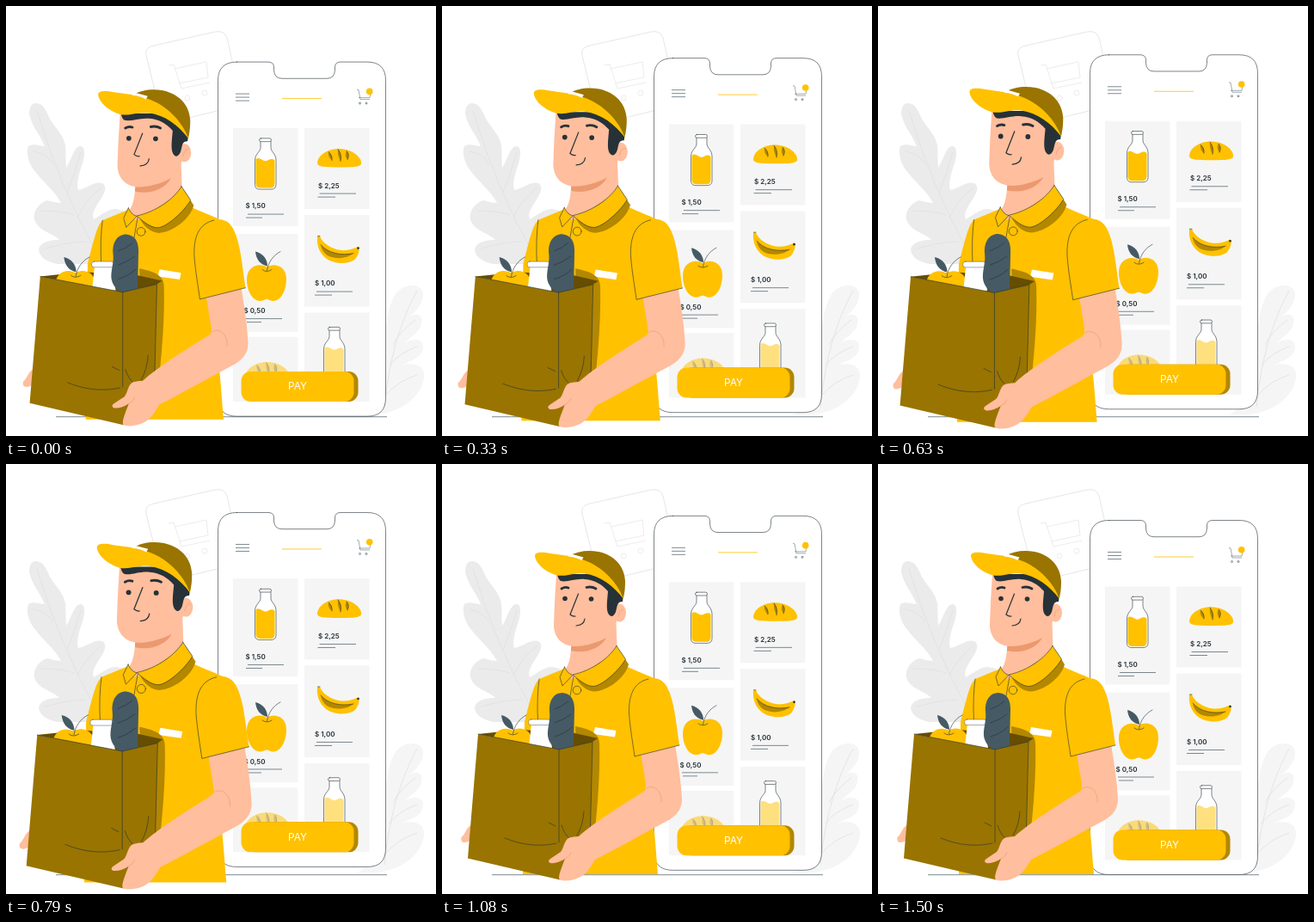
An HTML page for the animation above (1540 ms loop, 500 px wide and 500 px high).

```html
<!DOCTYPE html>
<html lang="en">
<head>
<meta charset="utf-8">
<title>Grocery delivery</title>
<style>
  html, body { margin: 0; width: 100%; height: 100%; overflow: hidden; background: #fff; }
  svg { display: block; width: 100vw; height: 100vh; }
  text { font: 600 8px Inter, sans-serif; fill: #263238; }
  .pay { font: 400 11.8px Inter, sans-serif; fill: #fff; text-anchor: middle; }
  .yellow { fill: #ffc100; }
  .olive { fill: #997400; }
  .shade { fill: #b38700; }
  .skin { fill: #ffbe9d; }
  .blush { fill: #eb996e; }
  .slate { fill: #455a64; }
  .ink { fill: #263238; }
  .white { fill: #fff; }
  .card { fill: #f5f5f5; }
  .line { fill: none; stroke: #263238; stroke-width: .6; stroke-linecap: round; stroke-linejoin: round; }
  .rule { fill: none; stroke: #455a64; stroke-width: .7; }
  .faint { fill: none; stroke: #e0e0e0; stroke-width: .8; }
  .face { stroke-width: 1.2; }
  .brow { stroke-width: 2.8; }
</style>
</head>
<body>
<svg viewBox="0 0 500 500">
  <defs>
    <g id="bottle">
      <path class="white" d="M296 158V165C296 170 289.5 172 289.5 180V208Q289.5 213.5 295 213.5H308Q314 213.5 314 208V180C314 172 308 170 308 165V158Z"/>
      <path fill="var(--milk, #ffc100)" d="M290.5 178.5C295 174.5 299 183 304 180C308 177.500 311 178 312.500 180V207Q312 212 308 212H296Q290.5 212 290.5 207Z"/>
      <path class="line" d="M296 158V165C296 170 289.500 172 289.500 180V208Q289.500 213.500 295 213.500H308Q314 213.500 314 208V180C314 172 308 170 308 165V158"/>
      <rect class="line" style="fill:#fff" x="294.500" y="154.300" width="14" height="3.800" rx="1.900"/>
    </g>
    <g id="bread">
      <path class="yellow" d="M362 183C362.500 174 373 166.300 388 166.300C404 167 414 177 413 184C412 187.500 405 188 388 188C370 188 362 187.500 362 183Z"/>
      <path class="shade" d="M375 170Q380 174 379 180Q374 176 375 170ZM386 167Q391 173 389 181Q385 174 386 167ZM396 169Q400 173 397 179Q393 174 396 169Z"/>
      <path class="line" d="M375 170Q380 174 379 180M386 167Q391 173 389 181M396 169Q400 173 397 179"/>
    </g>
    <g id="apple">
      <path class="yellow" d="M303 304C296 299 280 301 280 319C280 332 287 343.500 295.500 343.500C300 343 301 341.500 303 341.500C306 341.500 307 343.500 311 343.500C319 343.500 326 332 326 318C326 301 310 299 303 304Z"/>
      <path class="slate" d="M304 303C295 301 291 295 290 286C299 288 304 295 304 303Z"/>
      <path class="line" d="M303.500 308C305 298 311 290 319 286M298 307Q303 311 309 307"/>
    </g>
  </defs>

  <!-- backdrop -->
  <path fill="#ebebeb" d="M35 113C44 113 47 123 51 131C57 142 66 148 69 162C70 172 69 180 70 188C76 180 78 165 86 163C93 162 92 176 88 186C84 198 82 206 84 214C94 212 104 203 112 206C120 211 112 222 106 231C102 238 100 243 102 248C110 244 118 236 128 236L137 238L120 300H60C50 298 40 294 38 284C39 274 52 272 62 272C55 264 37 262 33 248C31 238 40 228 48 226C55 228 60 229 64 229C56 214 42 204 32 190C26 182 23 170 26 163C32 159 40 163 45 163C40 150 30 140 27 126C27 117 30 113 35 113Z"/>
  <path class="faint" d="M36 122Q62 210 108 292M32 169Q48 172 55 184M87 170Q80 195 71 216M41 238Q66 238 79 243M111 211Q92 226 83 246M46 282Q72 274 94 274"/>
  <path fill="#f5f5f5" d="M408 475C425 470 438 440 441 390C441 370 445 345 455 332C466 322 486 322 485 337C484 350 474 356 469 362C476 356 486 358 483 370C481 380 470 384 464 392C472 386 486 386 485 397C484 410 470 412 460 418C470 414 488 416 486 432C484 450 465 472 430 475Z"/>
  <path class="faint" d="M478 331Q448 385 440 466M476 365Q456 380 450 394M478 396Q456 404 446 418M478 429Q456 436 442 452"/>
  <path class="faint" d="M163 58Q161 49 170 46.500L243 30Q254 28 257 37L271 100Q273 115 262 118L192 135Q183 137 181 130Z"/>
  <g class="faint" style="stroke:#e8e8e8">
    <path d="M189 69L195 68L204 96L237 89M196 73L233 65L235 83L201 90"/>
    <circle cx="211" cy="107" r="3"/><circle cx="231" cy="101" r="3"/>
  </g>
  <path class="rule" d="M58 477.700H443"/>

  <g id="phone">
    <path class="line" style="fill:#fff" d="M268.500 65.500H305Q311 65.500 311.500 71V75Q312 84.700 321 84.700H373Q382 84.700 382.500 75V71Q383 65.500 389 65.500H420Q441.500 65.500 441.500 87V456Q441.500 477.500 420 477.500H268.500Q246.500 477.500 246.500 456V87Q246.500 65.500 268.500 65.500Z"/>
    <path class="rule" d="M267 102.500H283M267 106.500H283M267 110.500H283"/>
    <path d="M321 108H367" stroke="#ffc100" stroke-width=".8"/>
    <path class="rule" style="stroke-width:.5" d="M408 97.500L410 98L412 109H423M410 107H423L424 101"/>
    <circle class="rule" cx="411.500" cy="113.500" r="1"/><circle class="rule" cx="419" cy="113.500" r="1"/>
    <circle class="yellow" cx="422.700" cy="99.800" r="3.800"/>
    <path class="card" d="M264 142.400h75.500v114h-75.500zM347 142.400h75.500v94h-75.500zM264 265.400h75.500v114h-75.500zM347 243.400h75.500v106.600h-75.500zM264 385.200h75.500v75.200h-75.500zM347 357h75.500v103.400h-75.500z"/>
    <use href="#bottle"/>
    <use href="#bottle" x="80" y="219.500" style="--milk:#ffe07f"/>
    <use href="#bread"/>
    <use href="#bread" x="-83.500" y="248" opacity=".5"/>
    <use href="#apple"/>
    <path class="yellow" d="M362 268H365C367 275 377 283 390 284.500C398 285 404 283 410 280C411.500 284 410 290 406 295C398 301.500 380 301 371 293C364 287 361 278 362 268Z"/>
    <path class="shade" d="M366 278C374 288 390 291 404 288C396 295 380 295 373 290C369 287 366.500 283 366 278Z"/>
    <path class="line" d="M362.500 268H365M366 278C374 288 390 291 404 288"/>
    <circle class="ink" cx="409.500" cy="282" r="1.300"/>
    <text x="278.500" y="235.700">$ 1,50</text>
    <text x="363" y="212">$ 2,25</text>
    <text x="276.500" y="357.700">$ 0,50</text>
    <text x="359" y="325.800">$ 1,00</text>
    <path class="rule" d="M281 242.500H323M279 246.500H298M364.500 218.500H407M362.500 222.500H383M279 364H321M280 368H297M361 332.500H403M359 336.500H379"/>
    <rect class="shade" x="280" y="425.400" width="129.500" height="35" rx="11"/>
    <rect class="yellow" x="273.500" y="425.400" width="131" height="35" rx="11"/>
    <text class="pay" x="339" y="446.700">PAY</text>
  </g>

  <g id="courier">
    <path class="yellow" d="M142 238L113 250C107 256 104 268 96 300L94 477H251C248 440 246 400 238 380L234 337L262 260C254 250 240 247 216 236L203 212C190 225 170 240 152 244Z"/>
    <path class="skin" d="M152 200L150 215C149 228 147 235 141 242L150 250C175 245 198 225 203.500 211L202 170Z"/>
    <path class="blush" d="M150.500 209C165 212 179 209 191 202C184 215 166 221 150 217Z"/>
    <ellipse class="skin" cx="206.500" cy="173" rx="7.500" ry="10.500"/>
    <path class="skin" d="M133 128L131 160L130 187C130 202 140 212 155 212C175 212 196 201 203 183L206 135Z"/>
    <path class="line" style="stroke:#eb996e" d="M205 177Q206 169 211 169"/>
    <path class="ink" d="M134 128H190L211 152L210 160C203 160 204 166 202 172C200 177 197 178 195 176C190 172 192 160 193 148C186 140 178 135 166 134C155 133 145 138 138 136Q135 134 134 128Z"/>
    <path class="line brow" d="M139 145Q143 142.500 147 144M168 143.500Q174 142 179 145"/>
    <circle class="ink" cx="143" cy="156.500" r="2.800"/><circle class="ink" cx="173.500" cy="157" r="2.800"/>
    <path class="line face" d="M158.500 151L149 175Q152 177.500 155 177M156 188Q165 187.500 166 180"/>
    <path class="yellow" d="M108 107C108 102 116 102 126 104L148 107L163 110C190 115 205 135 211.500 152L211 157C200 142 184 130 166 127.500C152 126 144 132 132 129C120 125 109 116 108 107Z"/>
    <path class="olive" d="M148 107C158 101 170 100 182 102C200 106 212 118 213 136C213 146 212 152 210.500 156C205 140 188 119 163 111Z"/>
    <path class="white" d="M150 104.500L164.500 108.500L162.500 112Q155 108 146.500 107.500Z"/>

    <path class="shade" d="M206 216L217 233C213 249 192 264 177 264.500C168 264 160 257 156 249Z"/>
    <path class="line" style="fill:#ffc100" d="M203 211.500L213.500 227C206 240 186 258 176 258.500C168 258.500 160 252 152 245C175 240 195 225 203 211.500Z"/>
    <path class="line" style="fill:#ffc100" d="M142.500 236L137 247.500L140 258L152 245.500Q145 243 142.500 236Z"/>
    <circle class="line" cx="157" cy="263" r="4.800"/>
    <path class="line" d="M113 250Q110 272 111.500 300M153 247L149 270"/>
    <path class="white" d="M178 306L202.500 310L201 317.500L176 314Z"/>

    <!-- groceries -->
    <path class="shade" d="M155 305C170 308 183 312 183 325C184 360 181 395 178 425L160 440Z"/>
    <path class="skin" d="M36 419C28 421 28 430 22.500 434C21 442 28 441 34 437Z"/>
    <path fill="#664d00" d="M42 314L90 309L150 312L181 319L175 323L136 332Z"/>
    <use href="#apple" x="-221" y="6"/>
    <path class="white" d="M104 302L103 311L101 330H128L124 302Z"/>
    <rect class="line" style="fill:#fff;stroke-width:.4" x="100.500" y="297" width="25.500" height="6.500" rx="3"/>
    <path class="slate" d="M125 288C124 275 130 266 140 266C150 267 154 274 154 285L153 329L136 334C127 328 122 321 123 311C124 302 126 296 125 288Z"/>
    <path class="line" d="M131 285Q140 282 147 276M131 301Q141 298 150 291M131 317Q142 314 151 306"/>
    <path class="olive" d="M42 314L136 332L175 323L172 445L137 483.500L30 458.500Z"/>
    <path class="line" d="M42 314L136 332L175 323L172 445M136 332V440M73 435C95 444 115 445 133 441M124 417L132 421M165 404Q164 420 157 432M139 420Q142 430 148 435"/>

    <!-- near arm -->
    <path class="skin" d="M231 336L271 326C275 350 278 370 279 390C279 402 272 410 260 416C230 432 200 449 178 460C172 469 168 480 152 483.500C146 485 140 485 136.500 483C135 479 138 472 143 459Q134 465 126 464Q122 462 126 459L138 451C142 446 142 437 148 434.500Q153 433 159 433C175 418 215 393 228 385C234 381 237 380 237.500 376Z"/>
    <path class="line" style="stroke:#eb996e" d="M238 377C246 372 256 380 255 393M143 459Q148 457 150 452"/>
    <path class="yellow" d="M244 249C224 252 217 270 218 290C219 310 222 325 224 340L276 327C272 300 270 275 262 260C258 252 252 249 244 249Z"/>
    <path class="line" d="M240 250C222 254 217 270 217.500 290C219 310 222 325 224 340L276 327"/>
  </g>
</svg>
<script>
  const LOOP = 1540, CYCLE = 1500, FRAME = 1000 / 24, LEAD = 30;
  const phone = document.getElementById('phone');
  const courier = document.getElementById('courier');
  // Two linear beats: [cycle fraction, growth]
  const beats = [[0, 0], [.1, .1], [.3, 0], [.4, 0], [.5, .1], [.6, 0], [1, 0]];

  function growth(p) {
    const i = beats.findIndex(([at]) => at >= p) || 1;
    const [a, from] = beats[i - 1], [b, to] = beats[i];
    return from + (to - from) * (p - a) / (b - a);
  }

  function draw() {
    const step = Math.floor((performance.now() % LOOP + 5) / FRAME);
    const p = Math.min(1, (step * FRAME + LEAD) / CYCLE);
    const lift = 10 * (1 - Math.abs(1 - 2 * p));
    phone.setAttribute('transform', `translate(0 ${-lift})`);
    courier.setAttribute('transform', `translate(151 293) scale(${1 + growth(p)}) translate(-151 -293)`);
    requestAnimationFrame(draw);
  }
  draw();
</script>
</body>
</html>
```
